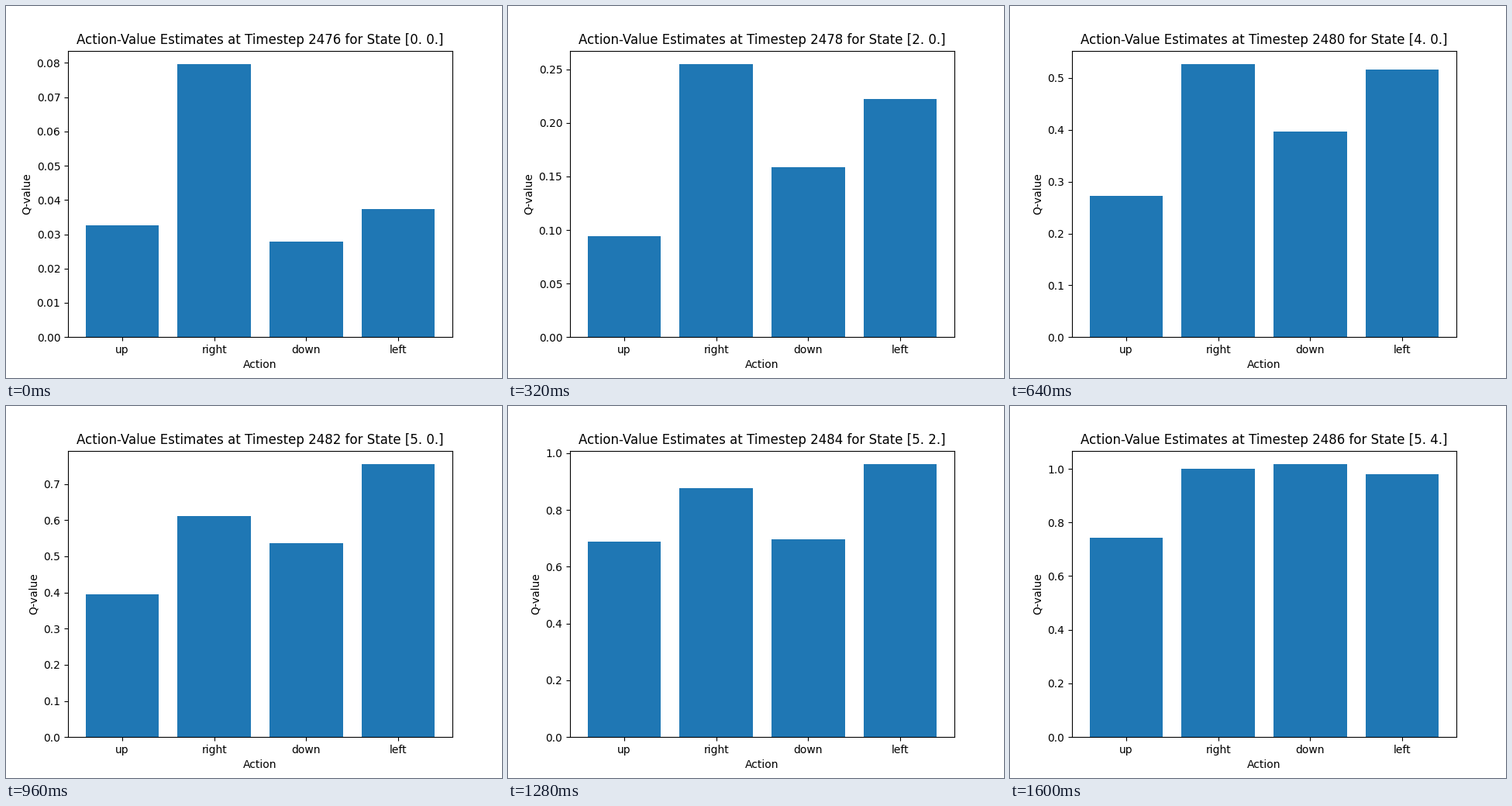
These frames come from a looping animation (640x480 px, 1760 ms). A matplotlib script:

```python
import matplotlib.pyplot as plt
import numpy as np
from matplotlib.animation import FuncAnimation

FIRST_STEP = 2476
STEP_COUNT = 11
INTERVAL = 160
CORNER = 5

# Each action's value rises along the walk through a few key points
KEY_MOVES = (0, 1, 2, 4, 5, 7, 9)
CURVES = {
    "up": (0.0326, 0.0313, 0.0943, 0.273, 0.395, 0.689, 0.743),
    "right": (0.0796, 0.1613, 0.25475, 0.5266, 0.611, 0.877, 1.0),
    "down": (0.0279, 0.0895, 0.1587, 0.397, 0.536, 0.697, 1.0168),
    "left": (0.0374, 0.1101, 0.2224, 0.5165, 0.7545, 0.9612, 0.98),
}

fig, ax = plt.subplots(figsize=(6.4, 4.8), dpi=100)


def progress(step):
    """Moves made so far: one per step, with a stall before the corner."""
    return np.interp(step, (0, 4, 5, 6, 10), (0, 4, 4.1, 5, 9))


def position(moves):
    """Cell on the walk: along x to the corner, then along y."""
    cell = int(moves)
    return min(cell, CORNER), max(cell - CORNER, 0)


def draw(step):
    moves = progress(step)
    x, y = position(moves)
    values = [np.interp(moves, KEY_MOVES, curve) for curve in CURVES.values()]
    ax.clear()
    ax.bar(list(CURVES), values, color="#1f77b4")
    ax.set_xlabel("Action")
    ax.set_ylabel("Q-value")
    ax.set_title(
        f"Action-Value Estimates at Timestep {FIRST_STEP + step} "
        f"for State [{x}. {y}.]"
    )
    return ax.patches


anim = FuncAnimation(
    fig, draw, frames=STEP_COUNT, init_func=lambda: draw(0),
    interval=INTERVAL, repeat=True, repeat_delay=0, blit=False,
)
plt.show()
```
